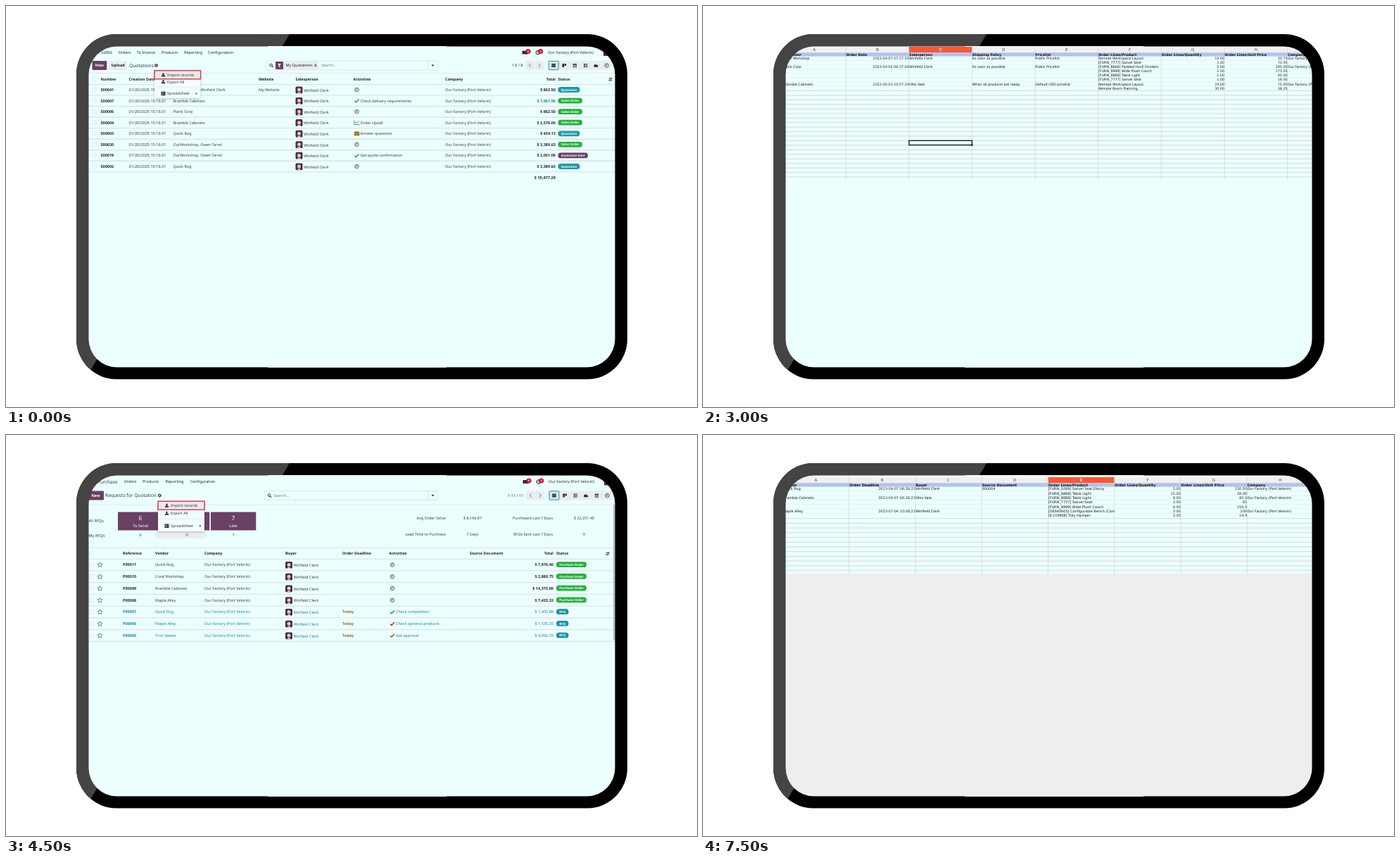
Recreate the animation shown at these times as an HTML page. Size 982x570 px, loop 8000 ms.

```html
<!DOCTYPE html>
<html lang="en">
<head>
<meta charset="utf-8">
<title>Importing records</title>
<style>
  html, body { margin: 0; width: 100%; height: 100%; overflow: hidden; background: #fff; }
  svg { display: block; }
  text { font-family: "Noto Sans", "Open Sans", sans-serif; text-rendering: geometricPrecision; white-space: pre; }
  .sheet text { font-family: "DejaVu Sans", sans-serif; }
  .b { font-weight: 700; }
  .s { font-weight: 600; }
  .m { text-anchor: middle; }
  .e { text-anchor: end; }
  .menu { filter: drop-shadow(0 1px 1.5px rgba(0, 0, 0, .25)); }
  .scene { opacity: 0; animation: show 8s step-end infinite; }
  .scene:last-child { animation-name: show-last; }
  @keyframes show { 0% { opacity: 1; } 18.75%, 100% { opacity: 0; } }
  @keyframes show-last { 0% { opacity: 1; } 6.25%, 100% { opacity: 0; } }
</style>
</head>
<body>
<svg id="stage" width="982" height="570" viewBox="0 0 982 570">
  <defs>
    <clipPath id="body"><rect x="100" y="40" width="783" height="490.5" rx="57"/></clipPath>
    <clipPath id="glass"><rect x="117.5" y="57.5" width="748" height="456" rx="40"/></clipPath>
  </defs>
  <g clip-path="url(#body)">
    <rect x="100" y="40" width="783" height="491"/>
    <path d="M100 40H403L120 518L100 531Z" fill="#444"/>
  </g>
  <g id="screen" clip-path="url(#glass)"></g>
</svg>
<script>
const INK = '#343a42', DARK = '#20242a', PLUM = '#6a4164', TEAL = '#17848a', BLUE = '#1b7fa6',
      GREEN = '#22a83a', GOLD = '#9a6a17', RED = '#e8303a', GREY = '#e9edef', LINE = '#dfe3e4', PAPER = '#ecffff';
const COMPANY = 'Our Factory (Port Velorin)', CLERK = 'Winfield Clerk';

const text = (x, y, str, cls = '', size = 5.45, fill = INK) =>
  `<text x="${x}" y="${y + size * .36}" class="${cls}" font-size="${size}" fill="${fill}">${str}</text>`;
const rect = (x, y, w, h, fill, rx = 0, more = '') =>
  `<rect x="${x}" y="${y}" width="${w}" height="${h}" fill="${fill}" rx="${rx}" ${more}/>`;
const frame = (x, y, w, h, stroke, width = 1, rx = 0) =>
  rect(x, y, w, h, 'none', rx, `stroke="${stroke}" stroke-width="${width}"`);
const path = (d, stroke, width = 1, fill = 'none') =>
  `<path d="${d}" fill="${fill}" stroke="${stroke}" stroke-width="${width}"/>`;
const circle = (x, y, r, fill, more = '') => `<circle cx="${x}" cy="${y}" r="${r}" fill="${fill}" ${more}/>`;
const rule = (y, color = LINE, width = 1.4) => path(`M117 ${y}H866`, color, width);
const at = (x, y, content) => `<g transform="translate(${x} ${y})">${content}</g>`;
const range = (n, fn) => Array.from({ length: n }, (_, i) => fn(i)).join('');

const icons = {
  gear: (c = DARK) => circle(0, 0, 1.5, 'none', `stroke="${c}" stroke-width="1.2"`) +
    circle(0, 0, 2.2, 'none', `stroke="${c}" stroke-width=".7" stroke-dasharray=".9 .83"`),
  clock: (c = DARK) => circle(0, 0, 2.7, 'none', `stroke="${c}" stroke-width=".75"`) + path('M0 -1.6V.3H-1.2', c, .7),
  check: c => path('M-3 .2L-1 2.1L3 -2', c, 1.5),
  chart: c => path('M-3.6 -3V2.8H4M-2.6 1.2L-.6 -1L.8 .2L3.4 -2.4', c, .9),
  mail: c => rect(-3.8, -2.7, 7.6, 5.6, c, .8) + path('M-3.6 -1.4L0 1.1L3.6 -1.4', PAPER, .6),
  load: (c = DARK) => path('M-2.6 1.6H2.6', c, 1.8) + path('M0 -2.9L1.9 -.6H.6V.9H-.6V-.6H-1.9Z', 'none', 0, c),
  lens: (c = DARK) => circle(-.5, -.5, 1.8, 'none', `stroke="${c}" stroke-width=".9"`) + path('M.8 .8L2.6 2.6', c, 1.1),
  caret: (c = DARK) => path('M-2 -1H2L0 1.2Z', 'none', 0, c),
  sliders: (c = DARK) => path('M-2.6 -1.2H2.6M-2.6 1.4H2.6', c, .8) + path('M1 -2.3V-.1M-1 .3V2.5', c, 1.1),
  star: (c = INK) => path('M0 -3.4L1 -1.1L3.5 -.9L1.6 .8L2.2 3.2L0 1.9L-2.2 3.2L-1.6 .8L-3.5 -.9L-1 -1.1Z', c, .6),
  list: (c = DARK) => rect(-2.8, -2.4, 5.6, 4.8, c) + path('M-2.8 -.8H2.8M-2.8 .8H2.8', GREY, .35),
  kanban: (c = DARK) => rect(-2.7, -2.5, 2.4, 5, c) + rect(.3, -2.5, 2.5, 3, c),
  calendar: (c = DARK) => frame(-2.3, -2, 4.6, 4.4, c, .6) + path('M-2.3 -1.4H2.3', c, 1.2) + path('M-2.3 .7H2.3M-.8 -1V2.4M.8 -1V2.4', c, .35),
  pivot: (c = DARK) => frame(-2.2, -2.2, 4.6, 4.6, c, .6) + path('M-2.2 -.7H2.4M-2.2 .9H2.4M-.6 -2.2V2.4', c, .5),
  area: (c = DARK) => path('M-3 2.2V-.2L-1 -2L.7 -.2L1.9 -1.2L3 2.2Z', 'none', 0, c),
};
const icon = (name, x, y, color) => at(x, y, icons[name](color));

const button = (x, y, w, label, primary) => rect(x, y - 6.5, w, 13, primary ? PLUM : GREY, 1.3) +
  text(x + w / 2, y, label, 's m', 5.4, primary ? '#fff' : DARK);

const badge = (x, y, n) => circle(x, y, 3.6, '#d9123c') + text(x, y, n, 'b m', 3.6, '#fff');

function navbar(y, app, appX, items, rightX) {
  return text(appX, y, app, '', 6.67) +
    items.map(([x, label]) => text(x, y, label, '', 5.55, DARK)).join('') +
    path(`M${rightX - 36} ${y - 1.8}h5v3.2h-3l-1.5 1.3v-1.3h-.5zM${rightX - 32.5} ${y + 2.2}h3.5v-2`, DARK, 1, DARK) +
    badge(rightX - 28, y - 1.5, '6') +
    at(rightX - 14, y, circle(0, 0, 2.8, 'none', `stroke="${DARK}" stroke-width="1.1"`) + path('M0 -1.5V.2H1.5', DARK, .8)) +
    badge(rightX - 10.3, y - 1.5, '3') +
    text(rightX, y, COMPANY, '', 5.45, DARK) + rect(rightX + 79, y - 4.5, 9.5, 9.5, '#4a2c45', 1.5);
}

function searchBar(x, y, placeX) {
  return frame(x, y - 6.5, 613 - x, 13, '#d9dfe1', .8, 1) + path(`M600.5 ${y - 6.5}V${y + 6.5}`, '#d9dfe1', .8) +
    icon('lens', x + 7.5, y) + text(placeX, y, 'Search...', '', 5.5, '#767d84') + icon('caret', 606.5, y);
}

function pager(y, label, labelX, x, views) {
  return text(labelX, y, label) + rect(x, y - 6.5, 12.2, 13, GREY, 1) + rect(x + 13, y - 6.5, 12.2, 13, GREY, 1) +
    path(`M${x + 7} ${y - 2.5}l-2.3 2.5l2.3 2.5M${x + 18.5} ${y - 2.5}l2.3 2.5l-2.3 2.5`, INK, .7) +
    rect(x + 47, y - 6.5, 76, 13, GREY, 1) +
    rect(x + 32.5, y - 6.2, 14, 12.4, '#d3e9eb', 1, `stroke="${TEAL}" stroke-width=".9"`) +
    views.map((name, i) => icon(name, x + 39.5 + i * 15.1, y)).join('');
}

function actionMenu(x, y, w, h, rows) {
  const [a, b, c] = rows, left = x + 18;
  return `<g class="menu">${rect(x, y, w, h, '#f1fefe', 1)}</g>` + rect(x, a - 5.5, w, 11, '#e6ebee') +
    icon('load', left - 5.5, a) + text(left, a, 'Import records') +
    icon('load', left - 5.5, b) + text(left, b, 'Export All') +
    path(`M${x} ${(b + c) / 2 - 1}h${w}`, LINE, .8) +
    rect(left - 8.5, c - 2.8, 6, 5.6, DARK, .5) + path(`M${left - 8.5} ${c - .9}h6m-6 1.8h6m-4 -3.4v5.2`, GREY, .4) +
    text(left, c, 'Spreadsheet') + path(`M${x + w - 6.8} ${c - 1.6}l2 1.6l-2 1.6z`, 'none', 0, DARK) +
    frame(x, a - 6, w, 12, RED, 1.4);
}

const person = (x, y) => rect(x, y - 4.6, 10, 10, '#4a2c45', 1.8) + circle(x + 5, y, 2.5, '#e3c5c3') +
  path(`M${x + 2} ${y + 5.4}q3 -5 6 0z`, 'none', 0, '#d9d3df') + text(x + 11.7, y + .7, CLERK);

const pills = { 'Quotation': [31, '#1a9aa6'], 'Sales Order': [34.5, '#22b238'], 'Quotation Sent': [42.5, PLUM],
                'Purchase Order': [43, '#22b238'], 'RFQ': [17.5, '#1a92a2'] };
function pill(x, y, label) {
  const [w, color] = pills[label];
  return rect(x, y - 3.9, w, 7.8, color, 3.9) + text(x + w / 2, y, label, 'b m', 4.45, '#fff');
}

const checkbox = (x, y) => frame(x, y - 2.7, 5.4, 5.4, '#d9e0e3', .7, 1);
const heads = (y, list) => list.map(([x, label, cls = '']) => text(x, y, label, 'b ' + cls, 5.4, DARK)).join('');

const salesRows = [
  ['S00041', 'OurWorkshop, ' + CLERK, 'clock', '', '862.50', 'Quotation'],
  ['S00007', 'Bramble Cabinets', 'check', 'Check delivery requirements', '1,961.90', 'Sales Order'],
  ['S00006', 'Plank Corp', 'clock', '', '862.50', 'Sales Order'],
  ['S00004', 'Bramble Cabinets', 'chart', 'Order Upsell', '2,576.00', 'Sales Order'],
  ['S00003', 'Quick Rug', 'mail', 'Answer questions', '434.13', 'Quotation'],
  ['S00020', 'OurWorkshop, Owen Tarrel', 'clock', '', '3,389.63', 'Sales Order'],
  ['S00019', 'OurWorkshop, Owen Tarrel', 'check', 'Get quote confirmation', '2,001.00', 'Quotation Sent'],
  ['S00002', 'Quick Rug', 'clock', '', '3,389.63', 'Quotation'],
];
const iconColor = { clock: DARK, check: GREEN, chart: GREEN, mail: GOLD };

function salesList() {
  const y = 84.5;
  return navbar(66, 'Sales', 135, [[159.5, 'Orders'], [186, 'To Invoice'], [221, 'Products'], [253, 'Reporting'], [287, 'Configuration']], 770) +
    button(122.5, y, 20.8, 'New', true) + button(146, y, 26, 'Upload') +
    text(175, y, 'Quotations', '', 6.67) + icon('gear', 213.5, y) +
    searchBar(369.5, y, 448) + rect(383, y - 5.5, 11, 11, PLUM, 1) + rect(394, y - 5.5, 50.5, 11, GREY, 1) +
    path(`M386 ${y - 2.5}h5l-1.8 2.3v3l-1.4 -1v-2z`, 'none', 0, '#fff') + text(397.5, y, 'My Quotations', '', 5.5, DARK) +
    path(`M438.2 ${y - 1.7}l3.4 3.4m0 -3.4l-3.4 3.4`, DARK, .9) +
    pager(y, '1-8 / 8', 718.5, 738.7, ['list', 'kanban', 'calendar', 'pivot', 'area', 'clock']) +
    rule(95.5, LINE, .8) + rule(111.6) + checkbox(122.5, 104) + icon('sliders', 859, 104) +
    heads(104, [[134.5, 'Number'], [174.5, 'Creation Date'], [359, 'Website'], [411.5, 'Salesperson'], [493.5, 'Activities'],
      [624, 'Company'], [781, 'Total', 'e'], [784.5, 'Status']]) +
    salesRows.map(([id, customer, kind, note, total, status], i) => {
      const y = 119 + i * 15.57;
      return checkbox(122.5, y) + text(134.5, y, id, 's', 5.5, DARK) + text(174.5, y, '01/20/2025 15:16:31', '', 5.55) +
        text(237.5, y, customer) + person(411.5, y) + icon(kind, 498.5, y, iconColor[kind]) + text(503.5, y, note) +
        text(624, y, COMPANY) + text(781, y, '$ ' + total, 's e', 5.5, i === 1 ? BLUE : DARK) +
        pill(784.5, y, status) + rule(y + 7.9);
    }).join('') +
    text(359, 119, 'My Website') + text(781, 243.5, '$ 15,477.29', 'b e', 5.6, DARK) +
    actionMenu(211, 91, 65.5, 40, [97.8, 107.6, 124.5]);
}

const orderRows = [
  ['P00011', 'Quick Rug', '', '', '7,976.40'],
  ['P00010', 'Coral Workshop', '', '', '2,880.75'],
  ['P00009', 'Bramble Cabinets', '', '', '14,375.00'],
  ['P00008', 'Maple Alley', '', '', '7,435.33'],
  ['P00007', 'Quick Rug', 'Check competitors', GREEN, '1,405.88'],
  ['P00006', 'Maple Alley', 'Check optional products', '#d3203f', '1,535.25'],
  ['P00005', 'Trim Seeker', 'Get approval', GOLD, '9,956.70'],
];

function purchaseList() {
  const y = 86;
  const card = (x, n, label) => rect(x, 109.5, 64.3, 26, PLUM) +
    text(x + 32, 118, n, 'm', 8.5, '#fff') + text(x + 32, 128.5, label, 'm', 5.8, '#fff');
  const stat = (y, label, value, label2, value2) => text(625, y, label, 'e') + text(663, y, value, 'm') +
    text(777, y, label2, 'e') + text(821.5, y, value2, 'm');
  return navbar(66.5, 'Purchase', 130, [[167.5, 'Orders'], [194, 'Products'], [226.5, 'Reporting'], [261.5, 'Configuration']], 771) +
    button(116, y, 23, 'New', true) + text(141, y, 'Requests for Quotation', '', 6.67) + icon('gear', 218.3, y) +
    searchBar(367, y, 380.5) +
    pager(y, '1-11 / 11', 713, 739.5, ['list', 'kanban', 'pivot', 'area', 'calendar', 'clock']) +
    rule(99, LINE, .8) + text(117.5, 122, 'All RFQs', '', 5.6) + text(117.5, 142.5, 'My RFQs', '', 5.6) +
    card(159, '6', 'To Send') + card(225, '0', 'Waiting') + card(291, '7', 'Late') +
    rect(211, 137, 74.5, 10, GREY, 5) +
    [[191, 6], [257, 0], [323, 7]].map(([x, n]) => text(x, 142.5, n, 'm')).join('') +
    stat(118.5, 'Avg Order Value', '$ 8,166.87', 'Purchased Last 7 Days', '$ 22,351.40') +
    stat(140.7, 'Lead Time to Purchase', '7 Days', 'RFQs Sent Last 7 Days', '0') +
    rule(160.5, LINE, 1) + rule(176.4) + checkbox(118.5, 168.5) + icon('sliders', 855, 168.5) +
    heads(168.5, [[166, 'Reference'], [212, 'Vendor'], [282, 'Company'], [397, 'Buyer'], [478, 'Order Deadline'],
      [544.5, 'Activities'], [659, 'Source Document'], [778, 'Total', 'e'], [782, 'Status']]) +
    orderRows.map(([id, vendor, note, color, total], i) => {
      const y = 184.5 + i * 16.75, ink = note ? BLUE : INK;
      return checkbox(118.5, y) + icon('star', 133.3, y) + text(166, y, id, 's', 5.5, note ? BLUE : DARK) +
        text(212, y, vendor, '', 5.45, ink) + text(282, y, COMPANY, '', 5.45, ink) +
        `<g ${note ? 'style="--name:' + BLUE + '"' : ''}>${person(397, y).replace(`fill="${INK}"`, `fill="${ink}"`)}</g>` +
        (note ? text(478, y, 'Today', 's', 5.5, GOLD) + icon('check', 549, y, color) + text(554, y, note, '', 5.45, ink)
              : icon('clock', 549, y)) +
        text(778, y, '$ ' + total, note ? 'e' : 's e', 5.5, note ? BLUE : DARK) +
        pill(782, y - .3, note ? 'RFQ' : 'Purchase Order') + rule(y + 8.4);
    }).join('') +
    rect(863, 99, 2.5, 193, '#b9bec1') +
    actionMenu(216, 94, 66, 43, [100.2, 111.2, 129.2]);
}

function illustration() {
  return circle(0, 0, 23, PLUM) +
    path('M-17.5 -21.5q0 -3 3 -3H12L18.5 -17.5V23H-17.5Z', '#b9b4bf', .8, '#eefafb') + path('M12 -24.5V-18H18.5', '#8f8796', .9, '#fff') +
    circle(-8, -11.5, 1.2, '#8f8796') + circle(8, -11.5, 1.2, '#8f8796') + path('M-6 -7Q0 -2.5 6 -7', '#8f8796', 1) +
    path('M-14 7H5M-14 11H14M-14 15H3M-14 18.5H6', '#eadfe3', 2) +
    path('M-23 -22.5L-18.5 -22M-21.5 -28.5L-18 -25M-15.5 -31L-15.8 -27', '#9a929f', .9);
}

function uploadPage(dx, dy, origin, app, buttonX, buttonW, box) {
  const body = button(120, 85.5, 52.5, 'Upload Data File', true) + button(175, 85.5, 25, 'Cancel') +
    text(203, 82.5, origin, 's', 5.05, TEAL) + text(203, 88.7, 'Import a File') + rule(99.2, '#d3dadc', 1) +
    at(491.3, 229, illustration()) +
    text(491.3, 260.5, 'Drop or upload a file to import', 'b m', 7.85, '#15191e') +
    text(491.3, 278.3, 'Table files are recommended as formatting is automatic.', 'm', 6.33) +
    text(491.3, 288, 'But, you can also use .csv files', 'm', 6.33) +
    text(489.8, 304.3, `Need Help? <tspan fill="${TEAL}">Import FAQ</tspan>`, 'm', 6.33);
  return at(dx, dy, body) + frame(buttonX, 320.7 + dy - 6.6, buttonW, 13.2, PLUM, .8, 1.3) +
    icon('load', buttonX + 7, 320.5 + dy) +
    text(buttonX + 11.5, 320.7 + dy, 'Import Template for ' + app, 's', 5.35, PLUM) +
    frame(...box, RED, 1.4);
}

function sheet({ left, pitch, top, active, size, titles, numeric, rows, rowPitch, gridTop, gridPitch, bottom }) {
  const x = i => left + i * pitch, headTop = top + 8.2, headH = 5.4, first = headTop + headH + rowPitch / 2 - .1;
  const cell = (i, y, str, cls = '') => `<svg x="${x(i)}" y="${y - 4}" width="${pitch}" height="8">${
    numeric.includes(i) && !cls ? text(pitch - .1, 4, str, 'e', size, '#222') : text(.3, 4, str, cls, size, '#111')}</svg>`;
  const grid = '#d2cdcf';
  return `<g class="sheet">` + rect(117, top, 750, 8.2, '#f0f0f0') + rect(x(active), top, pitch, 8.2, '#ff5630') +
    rect(117, headTop, 750, headH, '#b3c3ec') +
    range(9, i => path(`M${x(i)} ${top}V${bottom}`, grid, .7) +
      text(x(i) + pitch / 2, top + 4.4, 'ABCDEFGHI'[i], i === active ? 'b m' : 'm', 5.6, i === active ? '#fff' : '#444')) +
    range(rows.length - 1, i => path(`M117 ${first + (i + .5) * rowPitch}H866`, '#dde2e3', .5)) +
    range(Math.ceil((bottom - gridTop) / gridPitch), i => path(`M117 ${gridTop + i * gridPitch}H866`, grid, .8)) +
    titles.split('|').map((s, i) => cell(i, headTop + headH / 2, s, 'b')).join('') +
    rows.map((row, r) => row.split('|').map((s, i) => s && cell(i, first + r * rowPitch, s)).join('')).join('') + '</g>';
}

const salesSheet = () => sheet({
  left: 113.3, pitch: 89.67, top: 58, active: 2, size: 4.8, numeric: [1, 6, 7],
  rowPitch: 6.05, gridTop: 120.5, gridPitch: 6.45, bottom: 247,
  titles: 'Customer|Order Date|Salesperson|Shipping Policy|Pricelist|Order Lines/Product|Order Lines/Quantity|Order Lines/Unit Price|Company',
  rows: [
    `Coral Workshop|2023-04-07 07:27:33|${CLERK}|As soon as possible|Public Pricelist|Remote Workspace Layout|10.00|30.75|${COMPANY}`,
    '|||||[FURN_7777] Swivel Seat|1.00|70.00',
    `Plank Corp|2023-04-06 06:37:00|${CLERK}|As soon as possible|Public Pricelist|[FURN_6666] Padded Hush Dividers|5.00|295.00|${COMPANY}`,
    '|||||[FURN_8999] Wide Plush Couch|1.00|173.00',
    '|||||[FURN_8888] Table Light|1.00|40.00',
    '|||||[FURN_7777] Swivel Seat|1.00|18.00',
    `Bramble Cabinets|2023-30-03 10:57:34|Otto Vale|When all products are ready|Default USD pricelist|Remote Workspace Layout|24.00|75.00|${COMPANY}`,
    '|||||Remote Room Planning|30.00|38.25',
  ],
}) + frame(292.8, 191.3, 89.6, 6.3, '#111', 1.3) + rect(381.3, 196.5, 2.2, 2.2, '#111');

const purchaseSheet = () => rect(117, 57, 750, 3, '#f7f7f7') + rect(117, 197, 750, 318, '#eee') + sheet({
  left: 113.4, pitch: 94.25, top: 60, active: 4, size: 4.97, numeric: [1, 5, 6],
  rowPitch: 6.3, gridTop: 118.7, gridPitch: 6.72, bottom: 197,
  titles: 'Vendor|Order Deadline|Buyer|Source Document|Order Lines/Product|Order Lines/Quantity|Order Lines/Unit Price|Company',
  rows: [
    `Quick Rug|2023-04-07 06:38:23|${CLERK}|S00004|[FURN_0269] Swivel Seat Ebony|5.00|130.50|${COMPANY}`,
    '||||[FURN_8888] Table Light|15.00|38.00',
    `Bramble Cabinets|2023-04-07 06:38:23|Otto Vale||[FURN_8888] Table Light|9.00|85.5|${COMPANY}`,
    '||||[FURN_7777] Swivel Seat|3.00|65',
    '||||[FURN_8999] Wide Plush Couch|4.00|154.5',
    `Maple Alley|2023-07-04 10:08:23|${CLERK}||[DESK0005] Configurable Bench (Conf|3.00|200|${COMPANY}`,
    '||||[E-COM08] Tidy Hamper|3.00|14.4',
  ],
});

const salesUpload = () =>
  navbar(66, 'Sales', 132, [[156.5, 'Orders'], [183.5, 'To Invoice'], [218, 'Products'], [250, 'Reporting'], [285, 'Configuration']], 772) +
  uploadPage(0, 0, 'Quotations', 'Sales', 449, 84.5, [443.7, 311.8, 93.6, 18.4]);

const purchaseUpload = () =>
  navbar(65, 'Purchase', 130, [[167.5, 'Orders'], [194, 'Products'], [226.5, 'Reporting'], [261.5, 'Configuration']], 771) +
  uploadPage(-1.5, -1, 'Requests for Quotation', 'Purchase', 442.3, 95.5, [436.3, 310.5, 106.2, 20]);

const scenes = [salesList, salesUpload, salesSheet, purchaseList, purchaseUpload, purchaseSheet];
document.getElementById('screen').innerHTML = scenes.map((draw, i) =>
  `<g class="scene" style="animation-delay:${i && i * 1.5 - 8}s">${rect(117, 57, 750, 458, PAPER)}${draw()}</g>`).join('');
</script>
</body>
</html>
```
